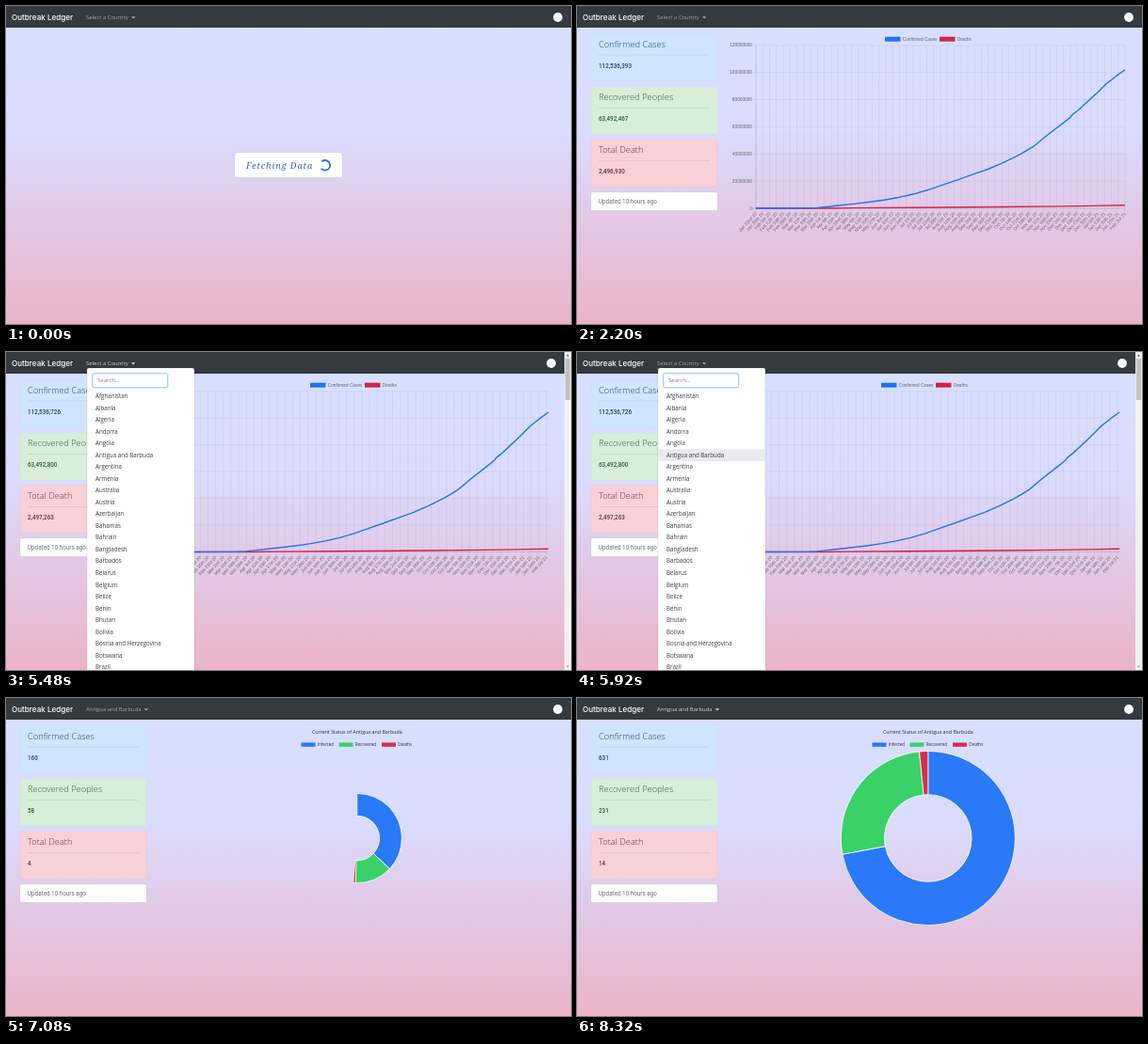
An HTML page with a canvas that plays this animation: 600 by 338 pixels, repeating every 8360 ms.

```html
<!DOCTYPE html>
<html lang="en">
<head>
<meta charset="utf-8">
<title>Outbreak Ledger</title>
<style>
html, body { margin: 0; width: 100%; height: 100%; overflow: hidden; }
canvas { display: block; width: 600px; height: 338px; }
</style>
</head>
<body>
<canvas id="stage"></canvas>
<script>
const LOOP = 8360, STEP = 40;
const DATA_AT = 880, COUNT_AT = 1023, CHART_AT = 1590, SETTLE_AT = 2200;
const OPEN_AT = 5480, PRESS_AT = 6320, CLOSE_AT = 6560, RING_AT = 6915, RECOUNT_AT = 7038;
const BLUE = '#1f75ee', RED = '#d22446';
const SANS = '"Open Sans", sans-serif', ROBOTO = 'Roboto, sans-serif';
const ARIAL = '"Liberation Sans", sans-serif', SERIF = '"Noto Serif", serif';

const WORLD = [112536726, 63492800, 2497263];
const LOCAL = [631, 231, 14];
const COUNTRY = 'Antigua and Barbuda';
const COUNTRIES = ['Afghanistan', 'Albania', 'Algeria', 'Andorra', 'Angola', COUNTRY, 'Argentina',
  'Armenia', 'Australia', 'Austria', 'Azerbaijan', 'Bahamas', 'Bahrain', 'Bangladesh', 'Barbados',
  'Belarus', 'Belgium', 'Belize', 'Benin', 'Bhutan', 'Bolivia', 'Bosnia and Herzegovina',
  'Botswana', 'Brazil'];

// [day, millions]
const CASES = [[0, 0], [40, .09], [55, .2], [63, .47], [70, .93], [85, 2.1], [100, 3.3], [115, 4.6],
  [131, 6.2], [146, 8.2], [161, 10.6], [176, 13.8], [192, 17.8], [207, 21.6], [223, 25.8], [238, 29.6],
  [253, 34.3], [268, 39.6], [276, 43], [284, 46.5], [299, 55.5], [314, 63.9], [322, 68.5], [324, 70.6],
  [330, 73.9], [345, 84], [352, 88.9], [359, 94], [369, 99.7], [378, 104.4]];
const DEATHS = [[0, 0], [60, .01], [70, .05], [100, .24], [161, .51], [253, 1.02], [314, 1.48],
  [345, 1.83], [378, 2.27]];
const LAST_DAY = 378;

const CARDS = [
  { y: 29.5, title: 'Confirmed Cases', fill: '#cfe4ff', edge: '#c2dcfa', ink: '#26406a' },
  { y: 86, title: 'Recovered Peoples', fill: '#d7eed9', edge: '#c8e6cc', ink: '#2c5c48' },
  { y: 142, title: 'Total Death', fill: '#f7d0d8', edge: '#f1c2cc', ink: '#6f2c3e' }
];

const canvas = document.getElementById('stage');
const c = canvas.getContext('2d');
const dpr = window.devicePixelRatio || 1;
canvas.width = 600 * dpr;
canvas.height = 338 * dpr;

const clamp = v => Math.max(0, Math.min(1, v));
const outQuart = v => 1 - (1 - clamp(v)) ** 4;
const outExpo = v => v <= 0 ? 0 : v >= 1 ? 1 : (1 - 2 ** (-10 * v)) * 1024 / 1023;

function text(str, x, y, font, color, align = 'left') {
  c.font = font;
  c.fillStyle = color;
  c.textAlign = align;
  c.fillText(str, x, y);
}

function box(x, y, w, h, fill, edge, r = 0, line = .5) {
  c.beginPath();
  c.roundRect(x, y, w, h, r);
  if (fill) { c.fillStyle = fill; c.fill(); }
  if (edge) { c.strokeStyle = edge; c.lineWidth = line; c.stroke(); }
}

function line(points, color, width) {
  c.beginPath();
  points.forEach(p => c.lineTo(...p));
  c.strokeStyle = color;
  c.lineWidth = width;
  c.lineJoin = 'round';
  c.stroke();
}

function triangle(x, y, w, h, color) {
  c.beginPath();
  c.moveTo(x, y);
  c.lineTo(x + w, y);
  c.lineTo(x + w / 2, y + h);
  c.fillStyle = color;
  c.fill();
}

function background() {
  const g = c.createLinearGradient(0, 23, 0, 338);
  g.addColorStop(0, '#d7dfff');
  g.addColorStop(.33, '#dadcff');
  g.addColorStop(1, '#ebb3c8');
  c.fillStyle = g;
  c.fillRect(0, 0, 600, 338);
}

function navbar(t, open) {
  box(0, 0, 600, 23, '#343a3e');
  text('Outbreak Ledger', 6, 14.5, '500 8.1px Inter, sans-serif', '#fff');
  const hover = t >= 4200 && t < 4400 || t >= 5000 && t < 5600 || t >= 7760;
  const color = `rgba(255,255,255,${hover ? .78 : .55})`;
  const label = t < CLOSE_AT ? 'Select a Country' : COUNTRY;
  text(label, 85, 14.2, '5.95px ' + SANS, color);
  triangle(85 + c.measureText(label).width + 3, 11.2, 4.6, 2.4, color);
  c.beginPath();
  c.arc(open ? 579 : 586, 12, 4.9, 0, 7);
  c.fillStyle = '#fff';
  c.fill();
}

function spinner(x, y, r, gap) {
  const a = gap * Math.PI / 180;
  c.beginPath();
  c.arc(x, y, r, a + Math.PI / 4, a + Math.PI * 7 / 4);
  c.strokeStyle = BLUE;
  c.lineWidth = 1.8;
  c.stroke();
}

function script(str, x, y, color, spacing) {
  c.letterSpacing = spacing + 'px';
  text(str, x, y, 'italic 9.2px ' + SERIF, color);
  c.letterSpacing = '0px';
}

function fetching(t) {
  box(243, 156, 114, 26, '#fff', 'rgba(0,0,0,.08)', 2);
  script('Fetching Data', 255, 172.6, '#2f62c6', .9);
  spinner(338.8, 169.3, 5.3, 185 + t * .48);
}

// Large totals run evenly to 333 short of the end, then ease in the rest.
function count(i, t) {
  if (t >= RING_AT) return LOCAL[i] * outExpo((t - RECOUNT_AT) / 1000);
  const near = WORLD[i] - 333;
  if (t <= SETTLE_AT) return near * clamp((t - COUNT_AT) / 1175);
  return near + 333 * outExpo((t - SETTLE_AT) / 900);
}

function cards(t) {
  CARDS.forEach(({ y, title, fill, edge, ink }, i) => {
    box(15, y, 134, 50, fill, edge, 1.6);
    text(title, 23, y + 14.4, '300 9.3px ' + SANS, ink);
    box(23, y + 22.3, 118, .5, 'rgba(60,60,90,.2)');
    const value = Math.round(count(i, t)).toLocaleString('en-US');
    text(value, 23, y + 36, '500 6.3px ' + ROBOTO, ink);
  });
  box(15, 198, 134, 19.3, '#fff', 'rgba(0,0,0,.08)', 1.6);
  text('Updated 10 hours ago', 23, 210.2, '6.3px ' + ROBOTO, '#6c7076');
}

function dateLabel(day) {
  const d = new Date(Date.UTC(2020, 0, 22 + day));
  const n = d.getUTCDate();
  const teen = n > 10 && n < 14;
  const suffix = !teen && ['', 'st', 'nd', 'rd'][n % 10] || 'th';
  const month = d.toLocaleString('en-US', { month: 'short', timeZone: 'UTC' });
  return `${month} ${n}${suffix} ${d.getUTCFullYear() - 2000}`;
}

function legend(items, font, y, h, color) {
  for (const [x, w, fill, label] of items) {
    box(x, y, w, h, fill);
    text(label, x + w + 2.2, y + h - .8, font, color);
  }
}

function lineChart(t, open) {
  const left = 190, top = 41.8;
  const right = open ? 576 : 582, base = open ? 212.5 : 215;
  const font = '4.75px ' + ARIAL, grid = 'rgba(0,0,0,.1)';
  const px = day => left + day / LAST_DAY * (right - left);
  const py = m => base - m / 120 * (base - top);
  const shift = open ? -4 : 0;
  legend([[327 + shift, 16.5, BLUE, 'Confirmed Cases'], [385 + shift, 16.5, RED, 'Deaths']],
    font, 32.7, 5, '#666');

  for (let m = 0; m <= 120; m += 20) {
    line([[left - 4, py(m)], [right, py(m)]], m ? grid : 'rgba(0,0,0,.25)', .5);
    text(m * 1e6, left - 4, py(m) + 1.6, font, '#666', 'right');
  }
  for (let day = 0; day <= LAST_DAY; day += open ? 8 : 7) {
    const x = px(day);
    line([[x, top], [x, base + 4]], day ? grid : 'rgba(0,0,0,.25)', .5);
    c.save();
    c.translate(x, base + 5);
    c.rotate(-48 * Math.PI / 180);
    text(dateLabel(day), 0, 1.6, font, '#666', 'right');
    c.restore();
  }
  const grow = outQuart((t - CHART_AT) / 1000);
  const plot = (data, color) => line(data.map(([d, m]) => [px(d), py(m * grow)]), color, 1.4);
  plot(DEATHS, RED);
  plot(CASES, BLUE);
}

function doughnut(t) {
  const colors = ['#2979f8', '#3ad168', '#d5304f'];
  const total = LOCAL[0] + LOCAL[1] + LOCAL[2];
  const grow = outQuart((t - RING_AT) / 1000);
  text('Current Status of ' + COUNTRY, 372.8, 37.8, '500 5.3px ' + SANS, '#2c2c38', 'center');
  legend([[313.5, 15, colors[0], 'Infected'], [353.5, 15, colors[1], 'Recovered'],
    [399, 15, colors[2], 'Deaths']], '4.6px ' + SANS, 47.4, 4.4, '#333');
  let a = -Math.PI / 2;
  LOCAL.forEach((v, i) => {
    const end = a + v / total * Math.PI * 2 * grow;
    c.beginPath();
    c.arc(372.8, 149, 92.5 * grow, a, end);
    c.arc(372.8, 149, 46.3 * grow, end, a, true);
    c.closePath();
    c.fillStyle = colors[i];
    c.fill();
    c.strokeStyle = '#fff';
    c.lineWidth = .8;
    c.stroke();
    a = end;
  });
}

function dropdown(t) {
  box(86, 17, 114, 340, '#fff', 'rgba(0,0,0,.18)', 2);
  const focus = 1 - clamp((t - PRESS_AT) / 120);
  box(92, 23, 79.5, 14.6, null, `rgba(0,123,255,${.27 * focus})`, 2, 2);
  box(92, 23, 79.5, 14.6, '#fff', focus > .5 ? '#80aef5' : '#ced4da', 1.6);
  text('Search...', 97, 32.4, '6px ' + SANS, '#7a7f85');

  const row = t < 5640 ? -1 : Math.min(5, Math.floor((t - 5640) / 40));
  COUNTRIES.forEach((name, i) => {
    const y = 47 + i * 12.52, pressed = i === row && t >= PRESS_AT;
    if (i === row) box(86.3, y - 6.2, 113.4, 12.5, pressed ? '#1a78f5' : '#e9e9ee');
    text(name, 95, y + 2.2, '6.2px ' + SANS, pressed ? '#fff' : '#3a3d42');
  });
}

function scrollbar() {
  box(593, 0, 7, 338, '#f1f1f1');
  box(593.8, 7, 5.4, 44, '#c1c1c1');
  triangle(595, 4.6, 3, -2, '#555');
  triangle(595, 333.5, 3, 2, '#999');
}

function draw(t) {
  const open = t >= OPEN_AT && t < CLOSE_AT;
  c.setTransform(dpr, 0, 0, dpr, 0, 0);
  background();
  navbar(t, open);
  if (t < DATA_AT) return fetching(t);
  cards(t);
  if (t < CHART_AT) {
    script('Loading', 343.5, 117.4, '#2462c8', .75);
    spinner(395.6, 114, 5.6, 95 + (t - 1160) * .48);
  } else if (t < RING_AT) {
    lineChart(t, open);
  } else {
    doughnut(t);
  }
  if (open) {
    dropdown(t);
    scrollbar();
  }
}

const start = performance.now();
function tick() {
  const t = (performance.now() - start) % LOOP;
  draw(Math.floor(t / STEP) * STEP);
  requestAnimationFrame(tick);
}
tick();
</script>
</body>
</html>
```
